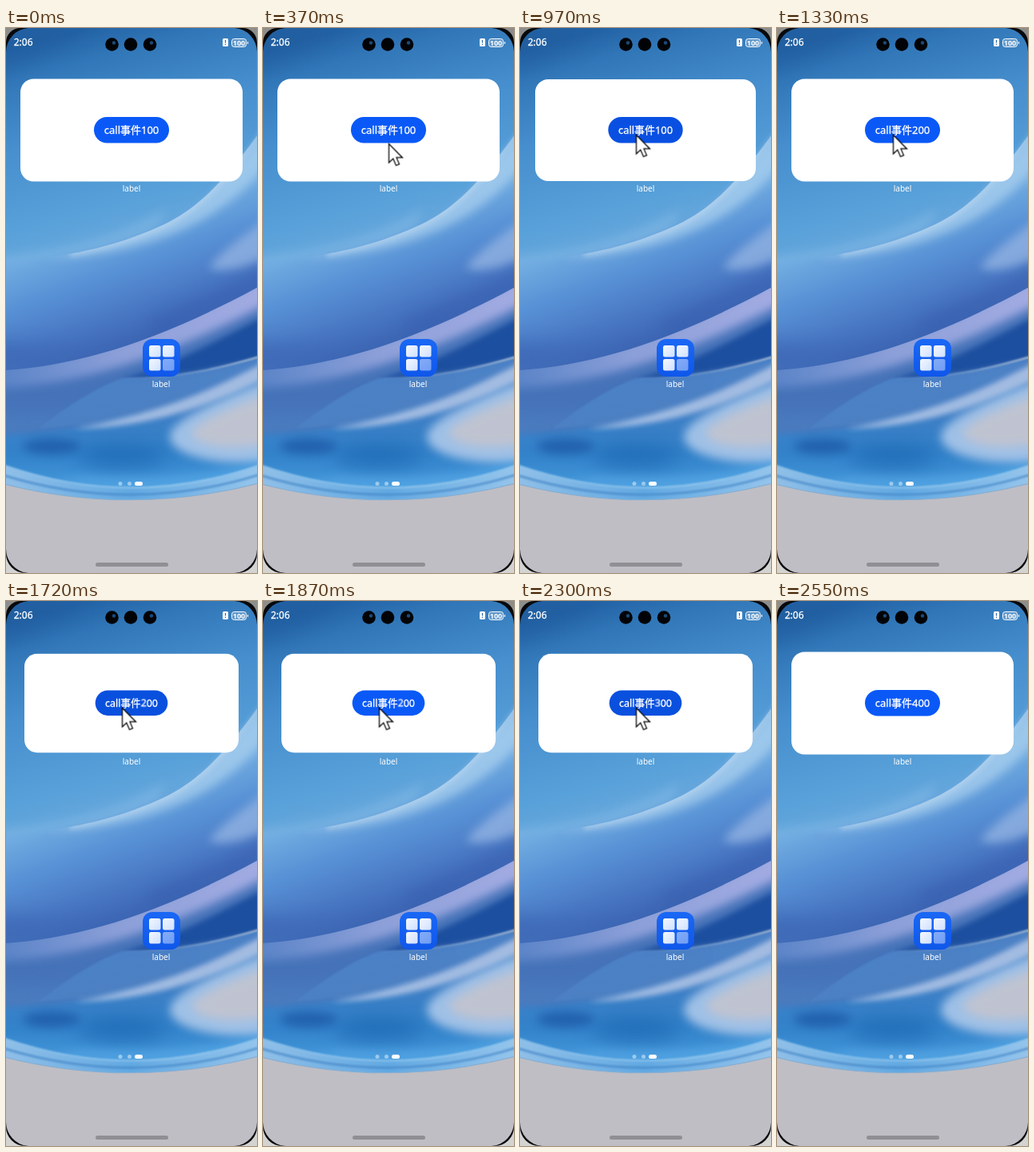
An HTML page for the animation above (3180 ms loop, 314x680 px).

```html
<!DOCTYPE html>
<html lang="en">
<head>
<meta charset="utf-8">
<title>Widget call event</title>
<style>
html, body { margin: 0; width: 100%; height: 100%; overflow: hidden; background: #bfbec4; }
svg.stage { display: block; width: 314px; height: 680px; }
text { font-family: "Noto Sans", "Noto Sans CJK SC", sans-serif; fill: #fff; }
.medium { stroke: #fff; stroke-width: .3px; }
.b1 { filter: blur(1px); }
.b3 { filter: blur(3px); }
.b6 { filter: blur(6px); }
.b12 { filter: blur(12px); }

.card, .digit, .cursor { animation: 3180ms step-end infinite; }
.card { color: #0a59f7; transform-origin: 157px 127.5px; animation-name: press; }
.digit { animation-name: count; }
.cursor { animation-name: move; }

@keyframes press {
  0%, 41.82%, 63.52%, 77.98%, 100% { transform: none; color: #0a59f7; }
  30.5%, 51.57%, 68.23% { transform: scale(.993); color: #0950e2; }
  33.01%, 54.08%, 70.75% { transform: scale(.964); color: #0950de; }
  35.22%, 56.6%, 72.95% { transform: scale(.952); color: #0950de; }
  37.42%, 58.8% { transform: scale(.964); color: #0a59f7; }
  39.62%, 61.32%, 75.47% { transform: scale(.987); color: #0a59f7; }
}
@keyframes count {
  0% { transform: none; }
  41.82% { transform: translateY(-30px); }
  63.52% { transform: translateY(-60px); }
  77.98%, 100% { transform: translateY(-90px); }
}
@keyframes move {
  0%, 80.18%, 100% { transform: translate(-60px, 0); }
  4.08% { transform: translate(230.5px, 389.5px); }
  6.6% { transform: translate(204.5px, 294.5px); }
  9.11% { transform: translate(177.5px, 200.5px); }
  11.63% { transform: translate(157.5px, 144.5px); }
  13.52% { transform: translate(141.5px, 136.5px); }
  16.35% { transform: translate(145.5px, 135.5px); }
  21.06% { transform: translate(145.5px, 133.5px); }
  77.98% { transform: translate(160.5px, 219.5px); }
}
</style>
</head>
<body>
<svg class="stage" viewBox="0 0 314 680">
  <defs>
    <linearGradient id="sky" gradientUnits="userSpaceOnUse" x1="105" y1="0" x2="185" y2="300">
      <stop offset="0" stop-color="#2363a6"/>
      <stop offset=".13" stop-color="#3278b9"/>
      <stop offset=".38" stop-color="#468ecd"/>
      <stop offset=".7" stop-color="#57a0d9"/>
      <stop offset="1" stop-color="#76b0e0"/>
    </linearGradient>
    <linearGradient id="slope" gradientUnits="userSpaceOnUse" x1="130" y1="245" x2="185" y2="400">
      <stop offset="0" stop-color="#74afe2"/>
      <stop offset=".35" stop-color="#5892d6"/>
      <stop offset=".65" stop-color="#4a79c4"/>
      <stop offset="1" stop-color="#3a62b0"/>
    </linearGradient>
    <linearGradient id="ridge" gradientUnits="userSpaceOnUse" x1="0" y1="0" x2="314" y2="0">
      <stop offset="0" stop-color="#5c85c8"/>
      <stop offset=".45" stop-color="#8c9fd8"/>
      <stop offset="1" stop-color="#a2abe2"/>
    </linearGradient>
    <linearGradient id="glint" gradientUnits="userSpaceOnUse" x1="150" y1="0" x2="314" y2="0">
      <stop offset="0" stop-color="#7fa5d8" stop-opacity=".3"/>
      <stop offset="1" stop-color="#ccd6dc"/>
    </linearGradient>
    <linearGradient id="pool" gradientUnits="userSpaceOnUse" x1="0" y1="480" x2="0" y2="585">
      <stop offset="0" stop-color="#3f7fc6"/>
      <stop offset=".5" stop-color="#3282ca"/>
      <stop offset="1" stop-color="#4b9fe0"/>
    </linearGradient>
    <linearGradient id="rim" gradientUnits="userSpaceOnUse" x1="0" y1="0" x2="314" y2="0">
      <stop offset="0" stop-color="#8fbfe8"/>
      <stop offset=".5" stop-color="#62a9e2"/>
      <stop offset="1" stop-color="#94c4ec"/>
    </linearGradient>
    <linearGradient id="icon" x1="0" y1="0" x2="0" y2="1">
      <stop offset="0" stop-color="#1a68f5"/>
      <stop offset="1" stop-color="#0f57ea"/>
    </linearGradient>
    <linearGradient id="tile" x1="0" y1="0" x2="1" y2="1">
      <stop offset="0" stop-color="#f4f8ff"/>
      <stop offset="1" stop-color="#cfe0ff"/>
    </linearGradient>
    <path id="lower" d="M-20 428C85 424 190 393 334 313V700H-20Z"/>
    <path id="ground" d="M-10 567Q157 611 324 566V690H-10Z"/>
    <clipPath id="inLower"><use href="#lower"/></clipPath>
    <clipPath id="inSlope">
      <path d="M-20 292C90 287 150 268 204 242C254 216 287 172 334 107V460H-20Z"/>
    </clipPath>
  </defs>

  <!-- Wallpaper -->
  <rect width="314" height="680" fill="url(#sky)"/>
  <path class="b12" d="M-20 -10H110C70 30 30 45 -20 60Z" fill="#1c5696" opacity=".3"/>
  <path class="b6" d="M-20 285C80 280 150 255 200 225L190 250C140 290 60 300 -20 330Z" fill="#7fb6e4" opacity=".6"/>
  <path class="b3" d="M-20 292C90 287 150 268 204 242C254 216 287 172 334 107V460H-20Z" fill="url(#slope)"/>
  <g clip-path="url(#inSlope)">
    <path class="b6" d="M50 288C160 268 240 230 334 115V160C290 222 210 280 50 288Z" fill="#a9cfee" opacity=".75"/>
    <path class="b3" d="M80 282Q150 268 204 242C254 216 287 172 334 107" fill="none" stroke="#cfe2f3" stroke-width="7" opacity=".5"/>
  </g>
  <path class="b6" d="M334 232C295 262 266 280 254 300C285 306 310 295 334 282Z" fill="#96b6e4" opacity=".75"/>
  <path class="b12" d="M180 365C240 340 290 320 334 295V320L180 390Z" fill="#3459ac" opacity=".6"/>
  <path class="b12" d="M-20 390C60 405 120 400 190 375L170 395L-20 428Z" fill="#3760ae" opacity=".6"/>

  <use href="#lower" fill="#4673b9"/>
  <g clip-path="url(#inLower)">
    <path class="b6" d="M-20 434C85 430 195 398 334 322" fill="none" stroke="url(#ridge)" stroke-width="32"/>
    <path class="b3" d="M145 438C210 420 265 390 334 354V408C265 424 205 437 145 438Z" fill="#1c4f9f"/>
    <path class="b1" d="M145 437C215 437 270 424 334 405V470L40 500C80 470 110 450 145 437Z" fill="#4f87cb" opacity=".75"/>
    <path class="b12" d="M-20 480C90 490 140 470 220 440L200 500L-20 520Z" fill="#4d80c2" opacity=".7"/>
    <path class="b3" d="M-20 507C80 507 190 484 334 432V600H-20Z" fill="url(#pool)"/>
    <ellipse class="b12" cx="145" cy="534" rx="55" ry="15" fill="#1a66b0" opacity=".7"/>
    <path class="b3" d="M334 411C270 446 205 478 85 500C180 499 262 470 334 432Z" fill="#b9cae8" opacity=".8"/>
    <path class="b1" d="M150 437.5C215 437 270 424 324 408" fill="none" stroke="url(#glint)" stroke-width="1.6"/>
    <path class="b6" d="M334 436C275 460 212 485 205 508C203 532 262 548 334 542Z" fill="#9fc0e6"/>
    <path class="b6" d="M334 455C290 470 245 488 232 504C236 522 285 528 334 516Z" fill="#c5c4cd" opacity=".85"/>
    <ellipse class="b6" cx="57" cy="522" rx="36" ry="10" fill="#1f5ca9" opacity=".85"/>
    <path class="b6" d="M95 560C180 565 250 560 324 538V558C250 580 150 580 60 565Z" fill="#56a8e6" opacity=".7"/>
  </g>
  <path class="b1" d="M-10 543Q157 604 324 543V580Q157 614 -10 580Z" fill="url(#rim)"/>
  <path class="b1" d="M-10 543Q157 604 324 543" fill="none" stroke="#a9d3f1" stroke-width="2" opacity=".7"/>
  <path class="b1" d="M-10 556Q157 609 324 555" fill="none" stroke="#4587c8" stroke-width="3" opacity=".7"/>
  <use href="#ground" fill="#bfbec4"/>
  <path d="M-10 567Q157 611 324 566" fill="none" stroke="#86aed2" stroke-width="1.2"/>

  <!-- Bezel -->
  <path d="M0 0H314V680H0ZM0 30V650A30 30 0 0 0 28 680H286A30 30 0 0 0 314 650V30A30 30 0 0 0 286 0H28A30 30 0 0 0 0 30Z" fill="#08090c" fill-rule="evenodd"/>
  <path d="M0 0H18A18 18 0 0 0 0 18ZM314 0V18A18 18 0 0 0 296 0Z" fill="#8d8d8b"/>
  <path d="M0 680V656A24 24 0 0 0 24 680ZM314 680H290A24 24 0 0 0 314 656Z" fill="#d3d3d2"/>

  <!-- Status bar -->
  <text class="medium" x="9.7" y="22" font-size="12">2:06</text>
  <g fill="#020306">
    <circle cx="132.5" cy="20.5" r="8.3"/>
    <circle cx="156" cy="20.5" r="8.3"/>
    <circle cx="180" cy="20.5" r="8.3"/>
  </g>
  <g fill="#1d4a78">
    <circle cx="135" cy="18.5" r="2.2"/>
    <circle cx="182" cy="18.5" r="2.2"/>
  </g>
  <rect x="271" y="13" width="7" height="10" rx="1.5" fill="#fff"/>
  <path d="M274.5 15V18.6M274.5 19.8V21" stroke="#2b69a9" stroke-width="1.2"/>
  <rect x="282.5" y="13.5" width="18" height="10" rx="3" fill="#fff" fill-opacity=".2" stroke="#fff"/>
  <path d="M302.5 17V20" stroke="#fff"/>
  <text x="291.5" y="21.8" font-size="9" font-weight="600" text-anchor="middle">100</text>

  <!-- Widget -->
  <g class="card">
    <rect x="18" y="63.5" width="278" height="128" rx="16.5" fill="#fff"/>
    <rect x="110" y="111" width="94" height="32.5" rx="16.25" fill="currentColor"/>
    <g class="medium" font-size="13">
      <text x="169" y="132" text-anchor="end">call事件</text>
      <svg x="169" y="117" width="7.5" height="20">
        <g class="digit">
          <text y="15">1</text>
          <text y="45">2</text>
          <text y="75">3</text>
          <text y="105">4</text>
        </g>
      </svg>
      <text x="176.4" y="132">00</text>
    </g>
  </g>
  <text x="157" y="204" font-size="10" text-anchor="middle">label</text>

  <!-- App -->
  <rect x="171" y="388" width="47" height="47" rx="12" fill="url(#icon)"/>
  <g fill="url(#tile)">
    <rect x="179" y="396" width="14.5" height="14.5" rx="2.5"/>
    <rect x="196" y="396" width="14.5" height="14.5" rx="2.5"/>
    <rect x="179" y="413" width="14.5" height="14.5" rx="2.5"/>
    <rect x="196" y="413" width="14.5" height="14.5" rx="2.5" opacity=".5"/>
  </g>
  <text x="194" y="448" font-size="10" text-anchor="middle">label</text>

  <!-- Page dots and home bar -->
  <g fill="#fff">
    <circle cx="143" cy="568.5" r="2.5" opacity=".45"/>
    <circle cx="154.5" cy="568.5" r="2.5" opacity=".45"/>
    <rect x="161" y="566" width="10" height="5" rx="2.5"/>
  </g>
  <rect x="112" y="667" width="91" height="5" rx="2.5" fill="#8f8f94"/>

  <g class="cursor">
    <path d="M0 0V23.5L5.3 18.5L9 27L13 25.3L9.5 17.2H17Z" fill="#fff" stroke="#000" stroke-width="1.25"/>
  </g>
</svg>
</body>
</html>
```
